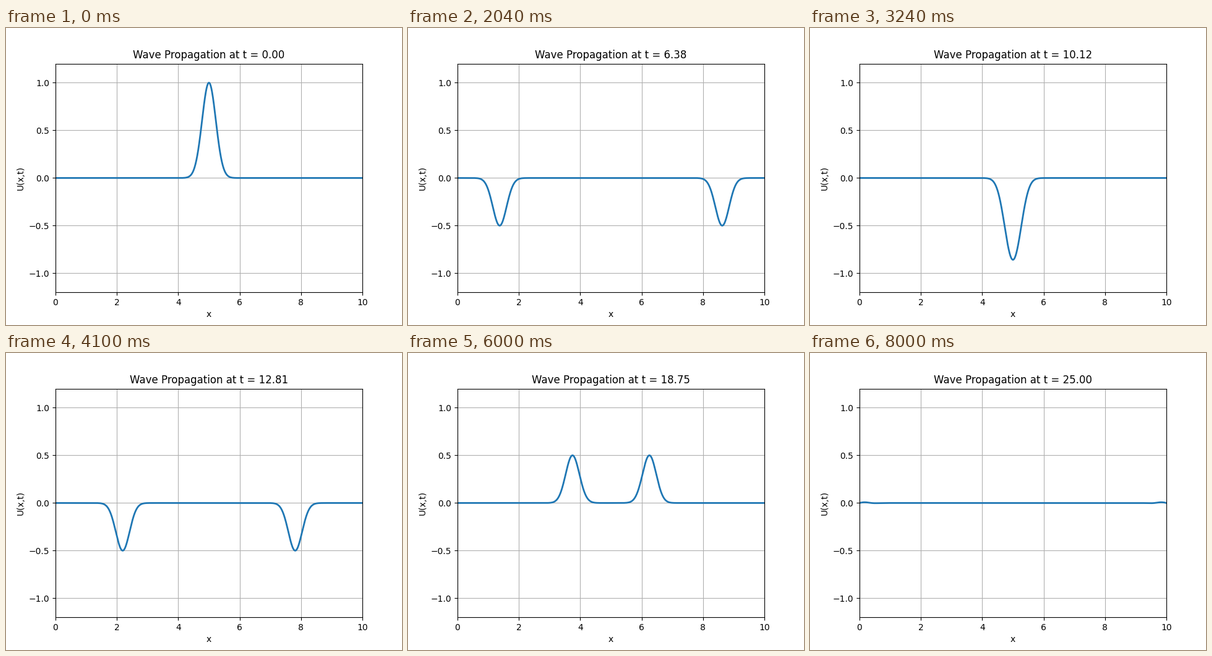
A matplotlib script for the animation above (8020 ms loop, 640x480 px).

```python
import numpy as np
import matplotlib.pyplot as plt
from matplotlib.animation import FuncAnimation

LENGTH, DURATION = 10.0, 25.0
CELLS, FRAMES, SUBSTEPS = 1000, 401, 10

x = np.linspace(0, LENGTH, CELLS + 1)
dt = DURATION / ((FRAMES - 1) * SUBSTEPS)
courant2 = (dt / (x[1] - x[0])) ** 2


def laplacian(u):
    out = np.zeros_like(u)
    out[1:-1] = u[2:] - 2 * u[1:-1] + u[:-2]
    return out


def solve():
    """Leapfrog wave equation, fixed ends, starting at rest."""
    u = np.exp(-10 * (x - LENGTH / 2) ** 2)
    u[0] = u[-1] = 0
    prev = u + 0.5 * courant2 * laplacian(u)
    states = [u]
    for _ in range(FRAMES - 1):
        for _ in range(SUBSTEPS):
            prev, u = u, 2 * u - prev + courant2 * laplacian(u)
        states.append(u)
    return states


waves = solve()

fig, ax = plt.subplots(figsize=(6.4, 4.8), dpi=100)
line, = ax.plot(x, waves[0], lw=2)
ax.set_xlim(0, LENGTH)
ax.set_ylim(-1.2, 1.2)
ax.set_xlabel("x")
ax.set_ylabel("U(x,t)")
ax.grid(True)
title = ax.set_title("")


def update(i):
    line.set_ydata(waves[i])
    t = i * DURATION / (FRAMES - 1)
    title.set_text(f"Wave Propagation at t = {t:.2f}")
    return line, title


anim = FuncAnimation(fig, update, frames=FRAMES, interval=20,
                     repeat=True, repeat_delay=0)
plt.show()
```
